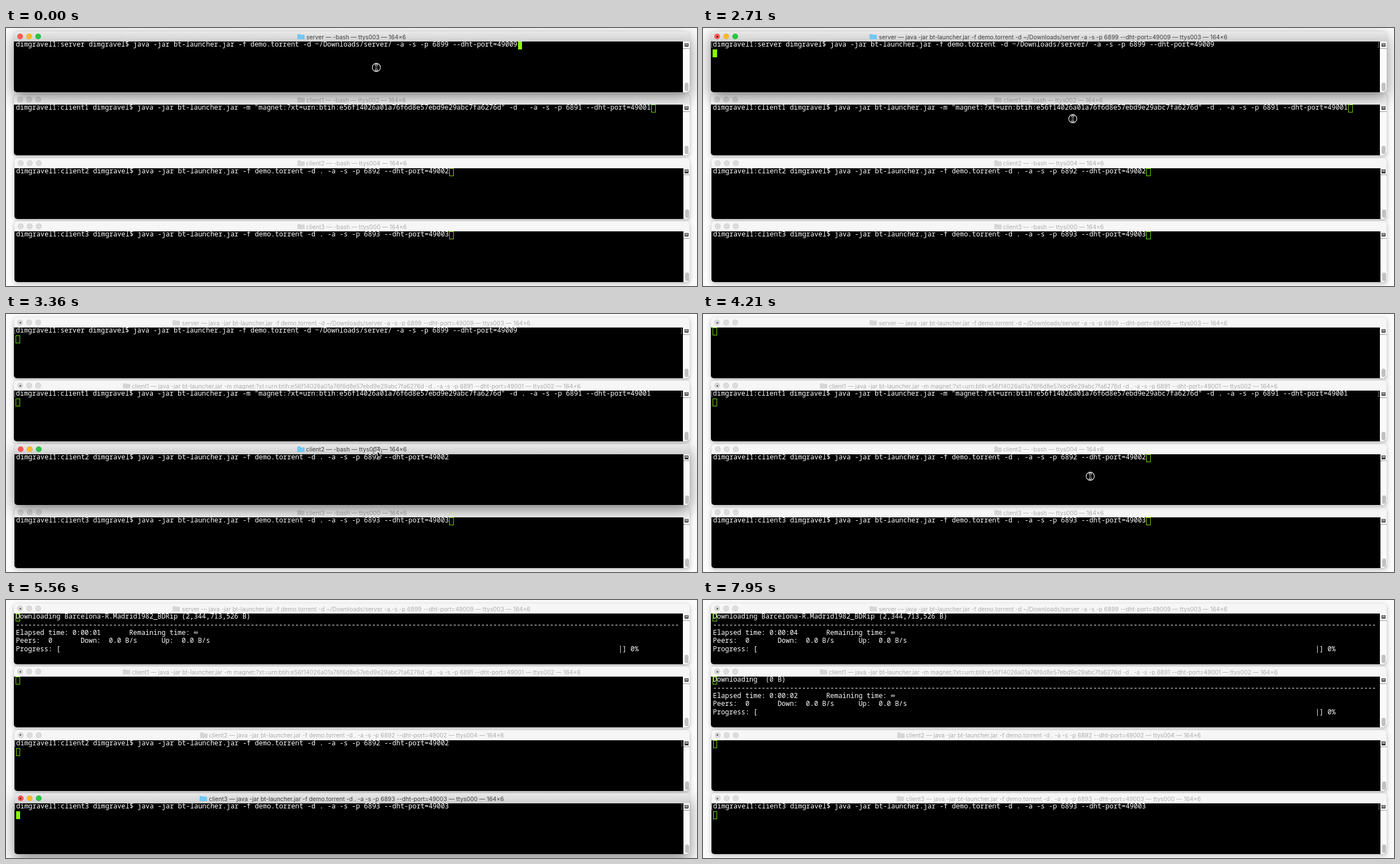
Recreate the animation shown at these times as an HTML page. Size 1224 px wide and 458 px high, loop 8 s.

```html
<!DOCTYPE html>
<html lang="en">
<head>
<meta charset="utf-8">
<title>Four terminals</title>
<style>
html, body { margin: 0; width: 100%; height: 100%; overflow: hidden; background: #fbfbfb; }
.window {
  position: absolute; width: 1196.5px; height: 108px; border-radius: 5px;
  box-shadow: 0 0 1px rgba(0,0,0,.35), 0 3px 9px rgba(0,0,0,.24);
}
.window.active { box-shadow: 0 0 1px rgba(0,0,0,.5), 0 9px 26px rgba(0,0,0,.46); }
.bar {
  position: relative; box-sizing: border-box; height: 18px; border-radius: 5px 5px 0 0;
  display: flex; align-items: center; justify-content: center; gap: 3px; padding-top: 1px;
  background: #f6f6f6; color: #adadad; font: 10.35px Inter, sans-serif; white-space: pre;
}
.active .bar { background: linear-gradient(#e9e9e9, #d0d0d0); color: #3f3f3f; }
.folder { position: relative; width: 13px; height: 8px; border-radius: 1px; background: #d6d6d6; top: .5px; }
.folder::before {
  content: ""; position: absolute; left: 0; top: -1.5px; width: 6px; height: 3px;
  border-radius: 1px; background: inherit;
}
.active .folder { background: #72c8f4; }
.light {
  position: absolute; top: 4px; width: 10px; height: 10px; border-radius: 50%;
  background: #dcdcdc; box-shadow: inset 0 0 0 .5px #c4c4c4;
}
.active .light { background: var(--color); box-shadow: inset 0 0 0 .5px rgba(0,0,0,.15); }
.running .light:first-child::after {
  content: ""; position: absolute; left: 3.5px; top: 3.5px; width: 3px; height: 3px;
  border-radius: 50%; background: #555;
}
.running.active .light:first-child::after { background: #5c0500; }
.screen { position: relative; height: 90px; overflow: hidden; background: #000; border-radius: 0 0 5px 5px; }
.text {
  position: absolute; left: 3.6px; top: -1.8px; color: #fff; white-space: pre;
  font: 500 11.953px/14.4px "Noto Sans Mono", monospace;
}
.cursor { position: absolute; box-sizing: border-box; width: 7.6px; height: 14px; border: 1px solid #77d800; }
.active .cursor { background: #88fa00; border-color: #88fa00; }
.mark { position: absolute; top: 1px; width: 2px; height: 10px; border: 1px solid #777; box-sizing: border-box; }
.mark.left { left: .5px; border-right: 0; }
.mark.right { left: 1181px; border-left: 0; }
.scroll { position: absolute; right: 0; top: 0; width: 11.5px; height: 90px; background: #fafafa; }
.split {
  position: absolute; left: 2.5px; top: 2.5px; width: 7px; height: 6.5px; box-sizing: border-box;
  border: 1px solid #333; background: linear-gradient(#fff 1px, #333 1px 2px, #fff 2px 3px, #333 3px);
}
.rule { position: absolute; top: 11.5px; width: 100%; height: 1px; background: #999; }
.thumb { position: absolute; left: 3px; top: 73px; width: 7px; height: 15px; border-radius: 3.5px; background: #c1c1c1; }
#mouse { position: absolute; left: 0; top: 0; z-index: 50; overflow: visible; fill: none; }
</style>
</head>
<body>
<svg id="mouse" width="1" height="1">
  <g id="beam">
    <circle r="7.2" stroke="#fff" stroke-width="1.1"/>
    <path d="M-3-6Q0-6 0-3V3Q0 6-3 6M3-6Q0-6 0-3V3Q0 6 3 6" stroke="#fff" stroke-width="2.8"/>
    <path d="M-3-6Q0-6 0-3V3Q0 6-3 6M3-6Q0-6 0-3V3Q0 6 3 6M-1.5 0H1.5" stroke="#000" stroke-width=".9"/>
  </g>
  <g id="arrow">
    <circle r="7.6" stroke="#555" stroke-width=".9"/>
    <path d="M0 0V11L2.6 8.7 4.4 12.6 6 11.9 4.3 8.1H7.7Z" fill="#000" stroke="#fff" stroke-width=".8"/>
  </g>
</svg>
<script>
const LOOP = 8000, COL = 7.172, ROW = 14.4;
const byId = id => document.getElementById(id);

// run: Enter pressed; clear: screen wiped; ticks: times at which the elapsed seconds advance
const terminals = [
  { name: 'server', tty: '003', x: 14, y: 6, run: 2560, clear: 3800, ticks: [5110, 6010, 7030, 7800], firstSecond: 1,
    args: '-f demo.torrent -d ~/Downloads/server/ -a -s -p 6899 --dht-port=49009',
    job: 'Barcelona-R.Madrid1982_BDRip (2,344,713,526 B)' },
  { name: 'client1', tty: '002', x: 14, y: 118, run: 2980, clear: 4960, ticks: [6160, 7170, 7950], firstSecond: 0,
    args: '-m "magnet:?xt=urn:btih:e56f14026a01a76f6d8e57ebd9e29abc7fa6276d" -d . -a -s -p 6891 --dht-port=49001',
    job: ' (0 B)', cursorGone: 4780 },
  { name: 'client2', tty: '004', x: 14.5, y: 230.5, run: 4510, clear: 7950, ticks: [],
    args: '-f demo.torrent -d . -a -s -p 6892 --dht-port=49002' },
  { name: 'client3', tty: '000', x: 14.5, y: 343, run: 5260, clear: Infinity, ticks: [],
    args: '-f demo.torrent -d . -a -s -p 6893 --dht-port=49003' },
];

// [time, focused window], -1 when no terminal has the focus
const focus = [[0, 0], [2830, 1], [3360, 2], [3800, -1], [4360, 2], [4780, -1], [4960, 3], [7950, -1]];
const blinkOff = [[480, 930], [1400, 1880], [2360, 2560], [3360, 3620], [6460, 6880], [7500, 7800]];
const mousePath = [[0, 656, 70], [2360, 656, 70], [2710, 655, 161], [2980, 655, 161], [3360, 658, 244],
  [3470, 658, 244], [4210, 686, 288], [4360, 686, 288], [4510, 691, 397], [5260, 691, 397]];

function build(term) {
  const el = document.createElement('div');
  el.className = 'window';
  el.style.left = term.x + 'px';
  el.style.top = term.y + 'px';
  const lights = ['#ff5b52', '#fdb927', '#27c840']
    .map((color, i) => `<i class="light" style="left:${6 + 16 * i}px;--color:${color}"></i>`).join('');
  el.innerHTML = `<div class="bar">${lights}<i class="folder"></i><span class="title"></span></div>
    <div class="screen"><div class="text"></div><i class="mark left"></i><i class="mark right"></i>
    <i class="cursor"></i><div class="scroll"><i class="split"></i><i class="rule"></i><i class="thumb"></i></div></div>`;
  document.body.append(el);
  term.el = el;
  for (const part of ['title', 'text', 'cursor']) term[part] = el.querySelector('.' + part);
  term.marks = el.querySelectorAll('.mark');
  term.command = 'java -jar bt-launcher.jar ' + term.args;
  term.prompt = `dimgravel1:${term.name} dimgravel$ ${term.command}`;
}

function setText(el, value) {
  if (el.textContent !== value) el.textContent = value;
}

function progress(term, t) {
  const ticks = term.ticks.filter(time => time <= t).length;
  if (!ticks) return '';
  return [
    'Downloading ' + term.job,
    '-'.repeat(164),
    `Elapsed time: 0:00:0${term.firstSecond + ticks - 1}       Remaining time: ∞`,
    'Peers:  0       Down:  0.0 B/s      Up:  0.0 B/s',
    'Progress: [' + ' '.repeat(138) + '|] 0%',
  ].join('\n');
}

function drawTerminal(term, index, t, events) {
  const active = events.at(-1)[1] === index;
  const running = t >= term.run, cleared = t >= term.clear;
  const process = running ? term.command.replace(/"|\/(?= )/g, '') : '-bash';
  term.el.classList.toggle('active', active);
  term.el.classList.toggle('running', running);
  const lastFocus = events.findLastIndex(event => event[1] === index);
  term.el.style.zIndex = lastFocus < 0 ? index : 10 + lastFocus;

  setText(term.title, `${term.name} — ${process} — ttys${term.tty} — 164×6`);
  setText(term.text, cleared ? progress(term, t) : term.prompt);
  for (const mark of term.marks) mark.hidden = !running || cleared;
  for (const mark of term.marks) mark.style.display = running && !cleared ? '' : 'none';

  const column = running ? 0 : term.prompt.length;
  const row = running && !cleared ? 1 : 0;
  const blinked = active && blinkOff.some(([from, to]) => t >= from && t < to);
  const gone = t >= term.cursorGone && !cleared;
  term.cursor.style.left = 3.4 + column * COL + 'px';
  term.cursor.style.top = row * ROW + 'px';
  term.cursor.style.display = blinked || gone ? 'none' : '';
}

function drawMouse(t) {
  const next = mousePath.findIndex(point => point[0] > t);
  byId('mouse').style.display = next < 0 ? 'none' : '';
  if (next < 0) return;
  const [t0, x0, y0] = mousePath[next - 1], [t1, x1, y1] = mousePath[next];
  const k = (t - t0) / (t1 - t0), x = x0 + (x1 - x0) * k, y = y0 + (y1 - y0) * k;
  byId('mouse').style.transform = `translate(${x}px, ${y}px)`;
  const overBar = terminals.some(term => y >= term.y && y < term.y + 18);
  byId('arrow').style.display = overBar ? '' : 'none';
  byId('beam').style.display = overBar ? 'none' : '';
}

function draw() {
  const t = performance.now() % LOOP;
  const events = focus.filter(event => event[0] <= t);
  terminals.forEach((term, i) => drawTerminal(term, i, t, events));
  drawMouse(t);
  requestAnimationFrame(draw);
}

terminals.forEach(build);
draw();
</script>
</body>
</html>
```
